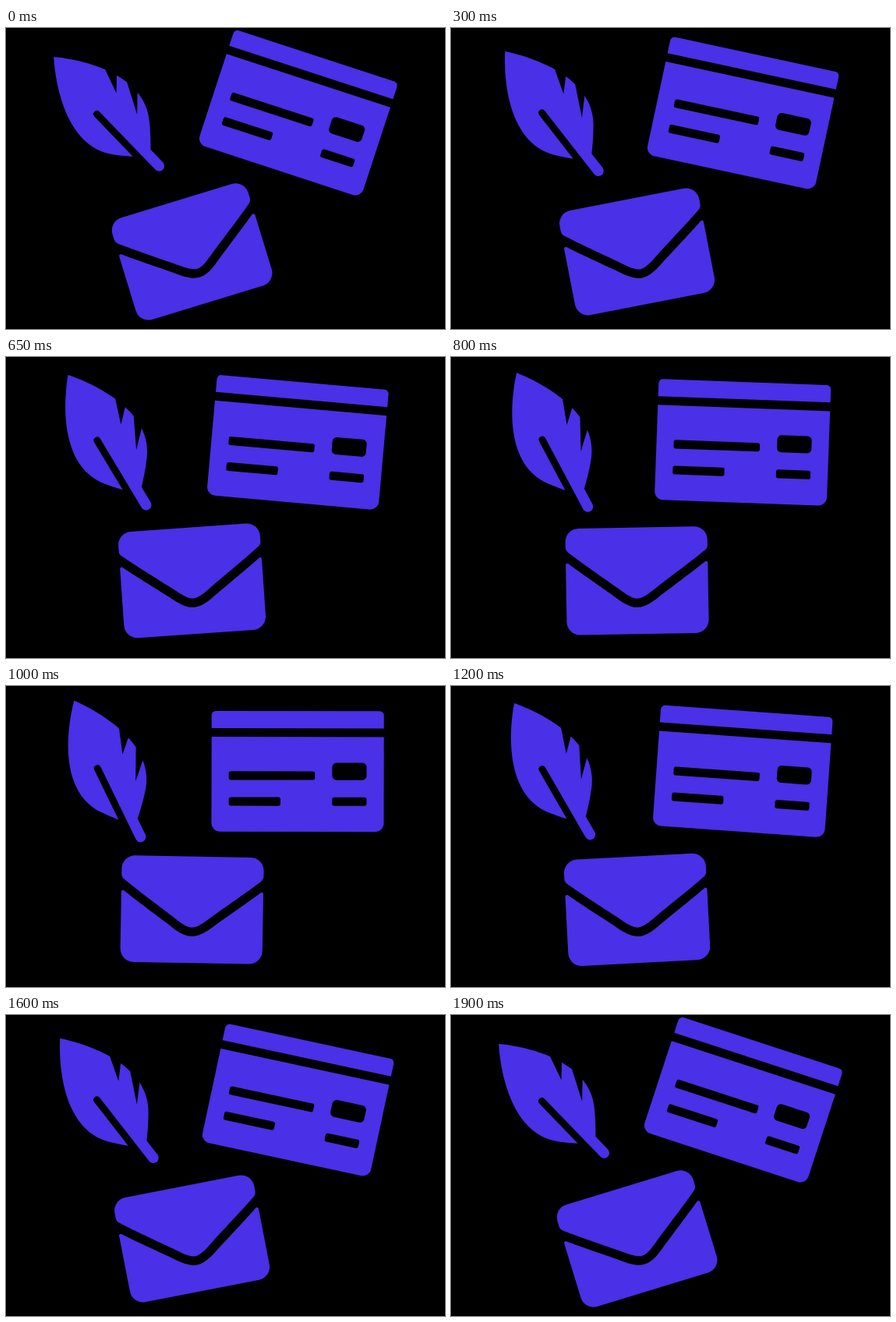
Animation, 563 px wide and 386 px high, one loop 1950 ms. Source, as an HTML page with a canvas:

```html
<!DOCTYPE html>
<html lang="en">
<head>
<meta charset="utf-8">
<title>Feather, card and envelope</title>
<style>
  html, body { margin: 0; width: 100%; height: 100%; overflow: hidden; background: #000; }
  canvas { display: block; width: 563px; height: 386px; }
</style>
</head>
<body>
<canvas id="stage"></canvas>
<script>
const W = 563, H = 386;
const LOOP = 1950, STEP = 50, TURN = 19;
const COLOR = '#4a30e6';

const canvas = document.getElementById('stage');
const ctx = canvas.getContext('2d');
const ratio = window.devicePixelRatio || 1;
canvas.width = Math.round(W * ratio);
canvas.height = Math.round(H * ratio);

// Every shape is built around the point (256, 256), the pivot of its swing.
const feather = new Path2D(
  'M512 0C460 3.5 96.5 38 71 287.6c-3 26.7-4.8 53.4-6 80.2l178.9-178.6' +
  'a16 16 0 0 1 22.6 22.6L7 471a24 24 0 0 0 34 34l57.1-57.1' +
  'c42.1-.1 84.2-2.5 126-7.4 53.5-5.4 97-26.4 132.6-56.5h-101l146.8-48.9' +
  'c11.3-14.9 21.4-30.7 30.5-47.1h-81.2l106.6-53.2C500.3 132.9 510.2 26.3 512 0z');

const flap = new Path2D(
  'M256 320c23.2.4 56.6-29.2 73.4-41.4C462 182.3 472.2 174 502.8 149.9' +
  'c5.8-4.5 9.2-11.5 9.2-18.9v-19a48 48 0 0 0-48-48H48a48 48 0 0 0-48 48v19' +
  'c0 7.4 3.4 14.3 9.2 18.9C39.8 173.8 50 182.3 182.6 278.6 199.4 290.8 232.8 320.4 256 320z');

const pocket = new Path2D(
  'M502.3 190.8c3.9-3.1 9.7-.2 9.7 4.7V400a48 48 0 0 1-48 48H48a48 48 0 0 1-48-48V195.6' +
  'c0-5 5.7-7.8 9.7-4.7 22.4 17.4 52.1 39.5 154.1 113.6 21.1 15.4 56.7 47.8 92.2 47.6' +
  ' 35.7.3 72-32.8 92.3-47.6 102-74.1 131.6-96.3 154-113.7z');

const envelope = new Path2D();
envelope.addPath(flap);
envelope.addPath(pocket);

// The card sits on a 20 by 14 grid.
function makeCard() {
  const u = 32, path = new Path2D();
  const box = (x, y, w, h, r) =>
    path.roundRect(256 + (x - 10) * u, 256 + (y - 7) * u, w * u, h * u, r);
  box(0, 0, 20, 2, [16, 16, 0, 0]);
  box(0, 3, 20, 11, [0, 0, 32, 32]);
  box(14, 6, 4, 2, 16);
  box(2, 7, 10, 1, 8);
  box(2, 10, 6, 1, 8);
  box(14, 10, 4, 1, 8);
  return path;
}

const items = [
  { path: feather, x: 132.1, y: 110.4, scale: 0.2818, from: -89, dir: 1 },
  { path: makeCard(), x: 374.1, y: 109.5, scale: 0.3453, from: 18.1, dir: -1 },
  { path: envelope, x: 238.6, y: 286.9, scale: 0.3558, from: -17, dir: 1 }
];

function drawItem({ path, x, y, scale, from, dir }, swing) {
  ctx.save();
  ctx.translate(x, y);
  ctx.rotate((from + dir * swing) * Math.PI / 180);
  ctx.scale(scale, scale);
  ctx.translate(-256, -256);
  ctx.fill(path, 'evenodd');
  ctx.restore();
}

const start = performance.now();

function draw(now) {
  const time = Math.max(0, now - start) % LOOP;
  const step = Math.floor(time / STEP);
  // One degree per step, out and back.
  const swing = TURN - Math.abs(TURN - step);
  ctx.setTransform(ratio, 0, 0, ratio, 0, 0);
  ctx.fillStyle = '#000';
  ctx.fillRect(0, 0, W, H);
  ctx.fillStyle = COLOR;
  for (const item of items) drawItem(item, swing);
  requestAnimationFrame(draw);
}

draw(start);
</script>
</body>
</html>
```
